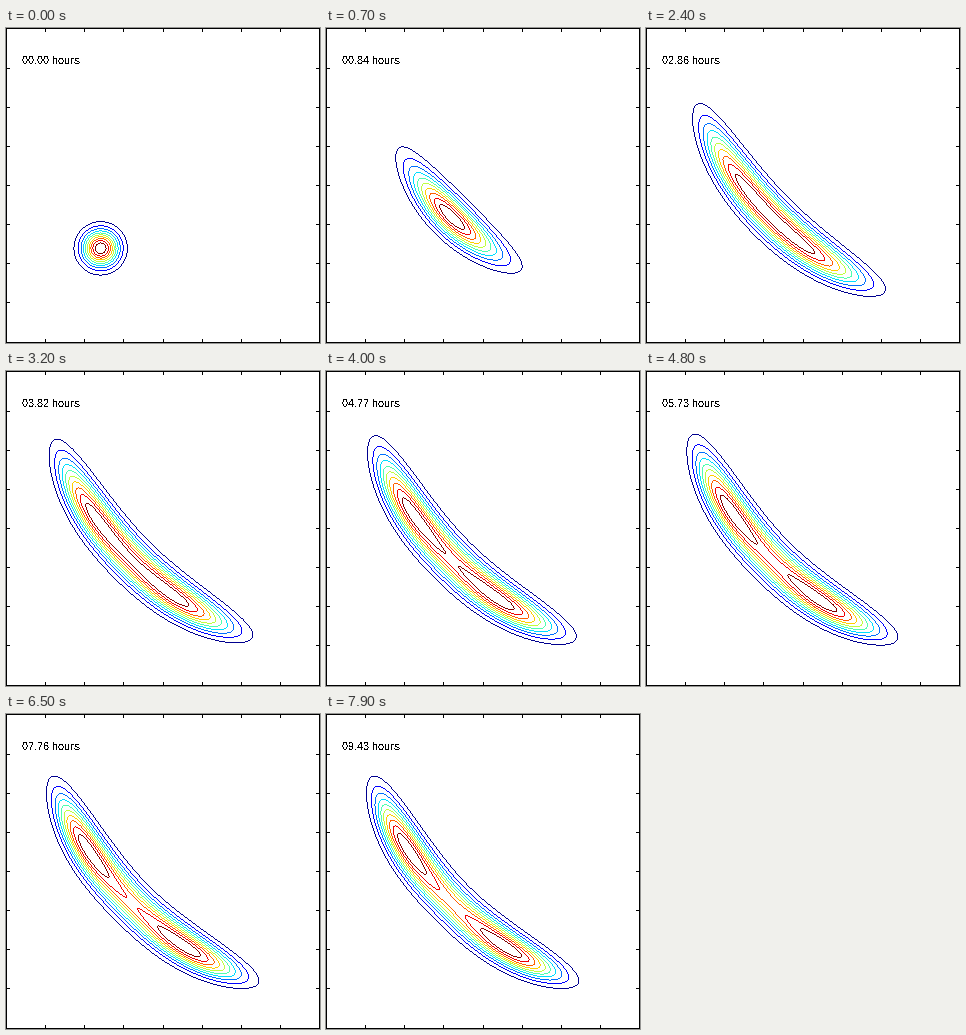
A matplotlib script that plays this animation: 314x315 px, repeating every 8 s.

```python
import numpy as np
import matplotlib.pyplot as plt
from matplotlib.animation import FuncAnimation

W, H, DPI = 314, 315, 100
FRAMES, STEP = 80, 100          # frame count, ms per frame
HOURS = 0.11937                 # simulated hours per frame
N = 10                          # contour levels
TICK = 4

plt.rcParams.update({
    "font.family": "Liberation Sans",
    "text.antialiased": False,
    "text.hinting": "native",
    "text.hinting_factor": 1,
})


def smooth(t, ts, ys):
    """Cubic Hermite curve through the points (ts, ys)."""
    ts, ys = np.array(ts), np.array(ys, float)
    m = np.gradient(ys, ts)
    i = min(np.searchsorted(ts, t, side="right") - 1, len(ts) - 2)
    h = ts[i + 1] - ts[i]
    s = (t - ts[i]) / h
    return ((1 + 2 * s) * (1 - s) ** 2 * ys[i] + s * (1 - s) ** 2 * h * m[i]
            + s * s * (3 - 2 * s) * ys[i + 1] + s * s * (s - 1) * h * m[i + 1])


def jet(f):
    x = (min(int(64 * f), 63) + 1) / 64
    return [np.clip(1.5 - abs(4 * x - c), 0, 1) for c in (3, 2, 1)]


# u runs across the diagonal, v along it
x, y = np.meshgrid(np.arange(W), np.arange(H))
u = (x - (W - y)) / np.sqrt(2)
v = (x + (W - y)) / np.sqrt(2)

REACH_T = [0, 0.7, 1.6, 2.7, 3.6, 4.5, 5.4, 7.9]
REACH = np.array([26.7, 86.3, 118.8, 136.2, 142.2, 144.7, 145.9, 146.2])
SPLIT_T = [0, 0.7, 1.6, 3.2, 4.8, 6.5, 7.9]
SPLIT = [0, 0.1, 0.61, 1.35, 1.634, 1.842, 1.944]


def neg_log_density(t):
    """-log(p / max p): a curved ridge that spreads and turns bimodal."""
    reach = np.sqrt(smooth(t, REACH_T, REACH ** 2))
    k = smooth(t, SPLIT_T, SPLIT)
    w = np.abs(u / reach) ** (2 - 0.2 * min(t / 1.6, 1))
    low = -(k - 1) ** 2 / (4 * k) if k > 1 else 0
    along = np.log(N + 1) * ((1 - k) * w + k * w * w - low) / (1 - low)

    settle = 1 - np.exp(-t / 0.13)
    ridge = 133.2 + 44.3 * settle + 0.00144 * settle * u ** 2
    width = smooth(t, [0, 0.7, 1.6, 7.9], [12.2, 10.7, 11.2, 11.4])
    width = width - 2 * settle * np.minimum(np.abs(u) / 146, 1.3) ** 2
    return along + ((v - ridge) / width) ** 2 / 2


def frame_box():
    img = np.ones((H, W, 3))
    img[[0, -1], :] = 0
    img[:, [0, -1]] = 0
    for k in range(1, 8):
        tx, ty = int(k * W / 8), int(1 + k * (W - 1) / 8)
        img[:TICK, tx] = img[-TICK:, tx] = 0
        img[ty, :TICK] = img[ty, -TICK:] = 0
    return img


box = frame_box()


def contours(t):
    """The box with one-pixel contour lines, lowest level first."""
    field = neg_log_density(t)
    gy, gx = np.gradient(field)
    half = np.maximum(np.abs(gx), np.abs(gy)) / 2
    img = box.copy()
    for k in range(N):
        level = np.log((N + 1) / (k + 1))
        img[np.abs(field - level) <= half] = jet(k / (N - 1))
    return img


fig = plt.figure(figsize=(W / DPI, H / DPI), dpi=DPI, facecolor="white")
ax = fig.add_axes([0, 0, 1, 1])
ax.set_axis_off()
picture = ax.imshow(box, interpolation="nearest", aspect="auto")
label = ax.text(15, 35.6, "", fontsize=7.68, color="black",
                ha="left", va="baseline")


def draw(i):
    picture.set_data(contours(i * STEP / 1000))
    label.set_text(f"{i * HOURS:05.2f} hours")
    return [picture, label]


anim = FuncAnimation(fig, draw, frames=FRAMES, interval=STEP, repeat=True)
plt.show()
```
